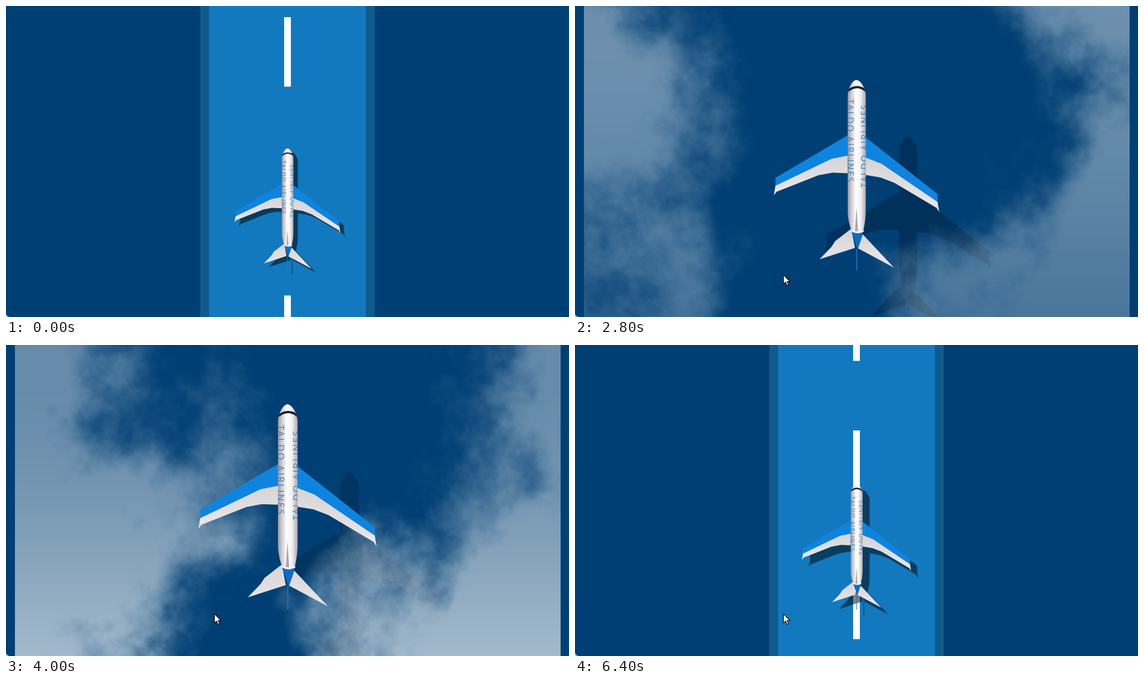
Recreate the animation shown at these times as an HTML page with a canvas. Size 1006 by 557 pixels, loop 6600 ms.

```html
<!DOCTYPE html>
<html lang="en">
<head>
<meta charset="utf-8">
<title>Flight</title>
<style>
  html, body { margin: 0; width: 100%; height: 100%; overflow: hidden; background: #c3ccd4; }
  #stage { position: absolute; left: 0; top: 0; width: 1006px; height: 557px; overflow: hidden;
    background: #003f74; border-bottom-left-radius: 7px; }
  svg, canvas { position: absolute; left: 0; top: 0; display: block; }
  #clouds { left: 16px; }
  #shadow { filter: brightness(0); }
  text { font: 17px "Open Sans", sans-serif; letter-spacing: 2.4px; fill: #3e82b8; }
</style>
</head>
<body>
<div id="stage">
  <svg width="1006" height="557">
    <rect id="edge" fill="#105b8e"/>
    <rect id="lane" fill="#1379be"/>
    <path id="dashes" fill="#fff"/>
    <use id="shadow" href="#craft"/>
  </svg>
  <canvas id="clouds" width="975" height="557"></canvas>
  <svg width="1006" height="557">
    <defs>
      <linearGradient id="body">
        <stop offset="0" stop-color="#98949d"/>
        <stop offset=".22" stop-color="#cfccd2"/>
        <stop offset=".45" stop-color="#fff"/>
        <stop offset=".7" stop-color="#f1f0f3"/>
        <stop offset="1" stop-color="#a5a1a9"/>
      </linearGradient>
      <linearGradient id="metal" x2="0" y2="1">
        <stop offset="0" stop-color="#d6d3d7"/>
        <stop offset="1" stop-color="#ebe9ec"/>
      </linearGradient>
      <clipPath id="hull">
        <path d="M0-368C10-366 17-350 18-338V-112Q17-92 12-73H-8Q-16-92-17-112V-338C-16-350-10-366 0-368Z"/>
      </clipPath>
      <g id="wing">
        <path d="M-17-222-48-216-156-164-159-145-154-152-73-184-46-189-17-188Z" fill="url(#metal)"/>
        <path d="M-17-261-156-179-156-164-48-216-17-222Z" fill="#0f84df"/>
      </g>
      <g id="craft">
        <use href="#wing"/>
        <use href="#wing" transform="skewY(11.3) scale(-1 1)"/>
        <path d="M-10-81-41-57-48-46-71-22-3-44ZM12-70 72-6 3-43Z" fill="url(#metal)"/>
        <g clip-path="url(#hull)">
          <path d="M-18-368H19V-70H-18Z" fill="url(#body)"/>
          <path d="M-16-347Q1-361 18-347" fill="none" stroke="#1d1f25" stroke-width="4"/>
          <text transform="translate(-18 -331) rotate(90)">TALDO AIRLINES</text>
          <text transform="translate(22 -160) rotate(-90)">TALDO AIRLINES</text>
          <path d="M0-124 3-76H-3Z" fill="#aaa7b0"/>
        </g>
        <path d="M-10-77Q2-70 14-77L2-41Z" fill="#0e6dc2"/>
        <path d="M-10-77Q2-70 14-77" fill="none" stroke="#f7f7f9" stroke-width="2.5"/>
        <path d="M.5-42V0" stroke="#2b78bb" stroke-width="1.8"/>
      </g>
    </defs>
    <use id="plane" href="#craft"/>
    <path id="cursor" d="M0 0V16.5L3.8 13 6.3 19 9 17.8 6.5 12H11.7Z" fill="#fff" stroke="#000" stroke-width="1.1"/>
  </svg>
</div>
<script>
const LOOP = 6600, STEP = 200, TILE = 1672;
const $ = id => document.getElementById(id);
const set = (id, attrs) => { for (const k in attrs) $(id).setAttribute(k, attrs[k]); };
const clamp = (v, lo = 0, hi = 1) => Math.min(hi, Math.max(lo, v));
const mod = (v, n) => ((v % n) + n) % n;
const mix = (a, b, k) => a + (b - a) * k;
const smooth = k => k * k * (3 - 2 * k);

// cubic-bezier(.25, .1, .25, 1)
function ease(x) {
  if (x <= 0 || x >= 1) return clamp(x);
  let lo = 0, hi = 1, s = .5;
  for (let i = 0; i < 24; i++) {
    s = (lo + hi) / 2;
    const px = .75 * s * (1 - s) + s ** 3;
    if (px < x) lo = s; else hi = s;
  }
  return .3 * s * (1 - s) ** 2 + 3 * s * s * (1 - s) + s ** 3;
}

const ramp = (t, start) => ease((t - start) / 1770);
const altitude = t => ramp(t, 1875) - ramp(t, 4275) + ramp(t, 6290);

function hash(x, y, n) {
  let h = Math.imul(x + 31, 374761393) ^ Math.imul(y + 17, 668265263) ^ Math.imul(n + 5, 1274126177);
  h = Math.imul(h ^ (h >>> 13), 1274126177);
  return ((h ^ (h >>> 16)) >>> 0) / 4294967296;
}

// Layered value noise around zero, periodic over the tile height
function noise(x, y) {
  let sum = 0, amp = .5, rows = 8;
  for (let n = 0; n < 7; n++) {
    const u = x / TILE * rows, v = y / TILE * rows;
    const i = Math.floor(u), j = Math.floor(v), k = (j + 1) % rows;
    const p = smooth(u - i), q = smooth(v - j);
    const top = mix(hash(i, j, n), hash(i + 1, j, n), p);
    const low = mix(hash(i, k, n), hash(i + 1, k, n), p);
    sum += amp * (mix(top, low, q) - .5);
    amp *= .6;
    rows *= 2;
  }
  return sum;
}

// Two cloud banks with a winding clear channel between them
function cloudAlpha(x, y) {
  const turn = 2 * Math.PI / TILE;
  const left = 250 + 95 * Math.cos((y + 320) * turn);
  const right = 725 - 140 * Math.cos(2 * y * turn);
  const depth = Math.max(left - x, x - right);
  const thickness = .72 + .22 * Math.cos((y - 320) * turn);
  return thickness * smooth(clamp(.34 + depth / 260 + noise(x, y) * 1.7));
}

function makeClouds() {
  const c = document.createElement("canvas");
  c.width = 488;
  c.height = TILE / 2;
  const g = c.getContext("2d"), img = g.createImageData(c.width, c.height);
  for (let j = 0, p = 0; j < c.height; j++) {
    for (let i = 0; i < c.width; i++, p += 4) {
      img.data.set([205, 217, 226, 255 * cloudAlpha(16 + i * 2, j * 2)], p);
    }
  }
  g.putImageData(img, 0, 0);
  return c;
}

const tile = makeClouds(), sky = $("clouds").getContext("2d");

function drawClouds(t, a) {
  sky.clearRect(0, 0, 975, 557);
  if (a < .05) return;
  sky.globalAlpha = a ** 3;
  const y = mod((t - 3200) * TILE / 2400, TILE);
  sky.drawImage(tile, 0, y, 976, TILE);
  sky.drawImage(tile, 0, y - TILE, 976, TILE);
}

function drawRunway(t, a) {
  const q = clamp((a - .05) / .9), landing = t > 3600 && t < 6290;
  const top = landing ? -300 : -250 + 1750 * a;
  const bottom = landing ? 185 + 2000 * (.5 - a) : 900;
  const band = (id, half) => {
    const w = half * (1 - .41 * q);
    set(id, { x: 503 - w, y: top, width: 2 * w, height: Math.max(0, bottom - top) });
  };
  band("edge", 156);
  band("lane", 140);

  const gap = 249.2 * 3 ** (-2 * q), half = 6 * (1 - .33 * q);
  const phase = t > 3600 ? .614 + (t - 6400) / 450 + .294 * q : .0803 + t / 450;
  let d = "";
  for (let y = (mod(phase, 1) - 1) * gap; y < 557; y += gap) {
    if (y >= top && y + gap / 2 <= bottom)
      d += `M${503 - half} ${y}h${2 * half}v${gap / 2}h${-2 * half}z`;
  }
  set("dashes", { d });
}

function render(t) {
  const a = altitude(t), scale = .595 + .405 * a;
  drawRunway(t, a);
  drawClouds(t, a);
  set("plane", { transform: `translate(503 474) scale(${scale})` });
  set("shadow", {
    transform: `translate(${511 + 102 * a} ${481 + 115 * a}) scale(${scale})`,
    opacity: .52 - .37 * a
  });
  const k = ease((t - 500) / 500);
  set("cursor", {
    transform: `translate(${372.5 * k} ${540 - 58.5 * k})`,
    visibility: t < 600 ? "hidden" : "visible"
  });
}

function tick(now) {
  render(Math.floor((now % LOOP) / STEP) * STEP);
  requestAnimationFrame(tick);
}
render(0);
requestAnimationFrame(tick);
</script>
</body>
</html>
```
